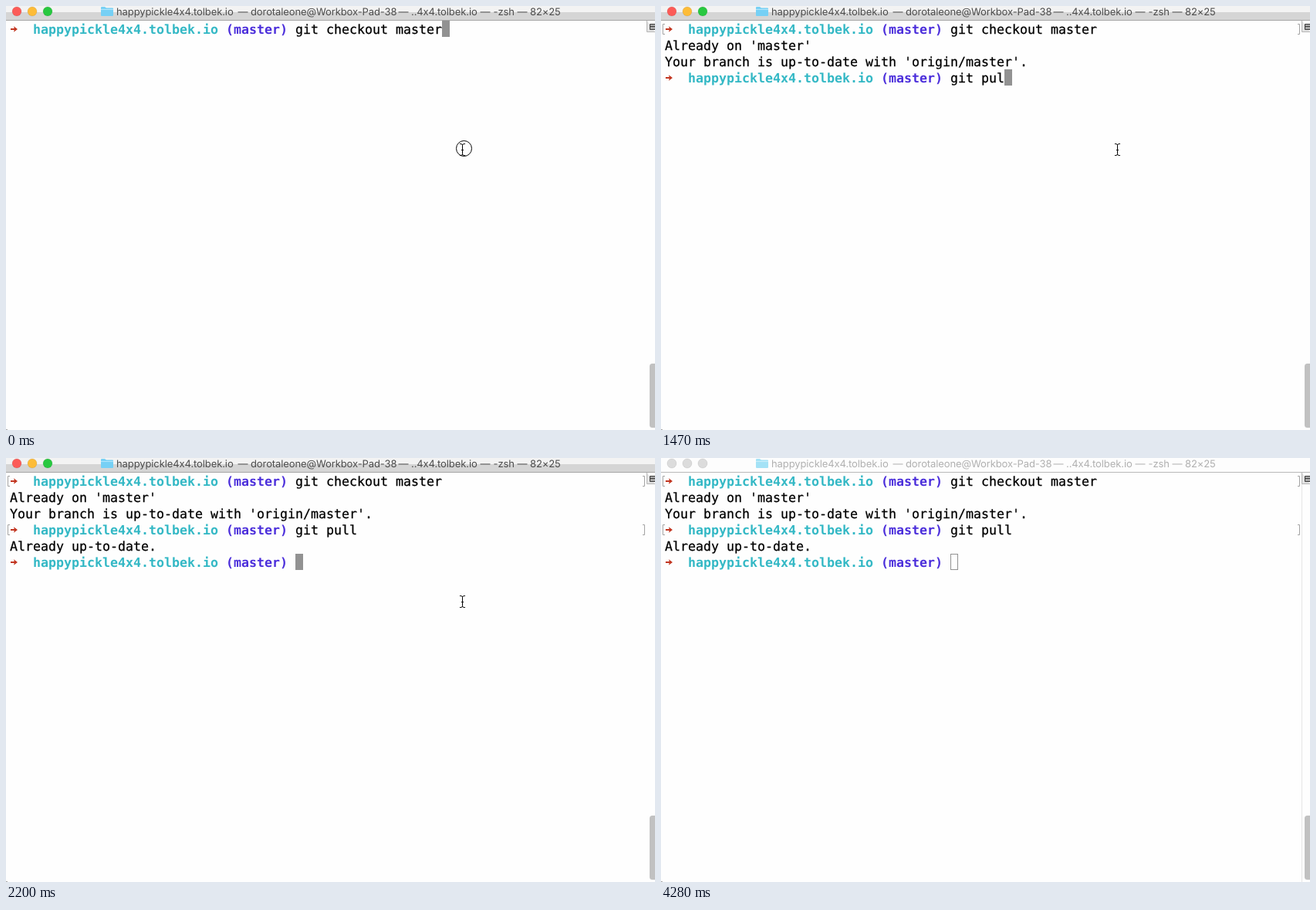
Recreate the animation shown at these times as an HTML page. Size 841 by 549 pixels, loop 4820 ms.

```html
<!DOCTYPE html>
<html lang="en">
<head>
<meta charset="utf-8">
<title>Terminal session</title>
<style>
  html, body { margin: 0; width: 100%; height: 100%; overflow: hidden; background: #fefefe; }
  svg {
    display: block; width: 841px; height: 549px;
    --bar-top: #f3f3f3; --bar: #d5d5d5; --rule: #a6a6a6; --label: #4b4b4b;
    --red: #fc5b57; --yellow: #fdbc38; --green: #28c840; --folder: #76d0f5;
  }
  svg.busy { --folder: #b9def0; }
  svg.idle {
    --bar-top: #fdfdfd; --bar: #fdfdfd; --rule: #b9b9b9; --label: #b0b0b0;
    --red: #dcdcdc; --yellow: #dcdcdc; --green: #dcdcdc; --folder: #a4e2f6;
  }
  text { text-rendering: geometricPrecision; white-space: pre; }
  .label { font: 13px Inter, sans-serif; letter-spacing: -.1px; fill: var(--label); }
  .mono { font: 16.61px "DejaVu Sans Mono", monospace; fill: #000; stroke: #000; stroke-width: .25; }
  .dir, .branch { font: bold 16.61px "DejaVu Sans Mono", monospace; }
  .dir { fill: #33b8c5; }
  .branch { fill: #4b2edb; }
  .lights circle { stroke: #0002; stroke-width: .6; }
  .line { fill: none; stroke: #000; }
</style>
</head>
<body>
<svg id="stage" viewBox="0 0 841 549">
  <defs>
    <g id="prompt">
      <path d="M6 11h6" stroke="#c23621" stroke-width="2"/>
      <path d="M10 7.2 15 11 10 14.8 11 11z" fill="#c23621"/>
      <text class="dir" x="35" y="17">happypickle4x4.tolbek.io</text>
      <text class="branch" x="285" y="17">(master)</text>
    </g>
    <path id="brackets" class="line" style="stroke:#a3a3a3" d="M5 4.5H2.5v13H5M825 4.5h2.5v13H825"/>
  </defs>

  <rect width="841" height="549" fill="#fefefe"/>
  <rect width="841" height="8" fill="var(--bar-top)"/>
  <rect y="8" width="841" height="10" fill="var(--bar)"/>
  <rect y="18" width="841" height="1" fill="var(--rule)"/>
  <g class="lights">
    <circle cx="14" cy="7" r="6" fill="var(--red)"/>
    <circle cx="34" cy="7" r="6" fill="var(--yellow)"/>
    <circle cx="54" cy="7" r="6" fill="var(--green)"/>
  </g>
  <circle data-on="140-290 1910-2200" cx="14" cy="7" r="2" fill="#7c100c"/>

  <g id="title">
    <path d="M123 2q0-1 1-1h4l2 1.5h8q1 0 1 1V12q0 1-1 1h-14q-1 0-1-1z" fill="var(--folder)"/>
    <path d="M123 4.5h16" stroke="#fff" stroke-opacity=".45"/>
    <text class="label" x="143" y="12">happypickle4x4.tolbek.io</text>
    <text class="label" x="300.5" y="12">—</text>
    <text class="label" x="317" y="12">dorotaleone@Workbox-Pad-38</text>
    <text class="label" x="508.5" y="12">—</text>
    <text class="label" x="525" y="12">..4x4.tolbek.io</text>
    <text class="label" x="614.5" y="12">—</text>
    <g data-on="0-2060 2200-4820">
      <text class="label" x="631.5" y="12">-zsh</text>
      <text class="label" x="662.5" y="12">—</text>
      <text class="label" x="679" y="12">82×25</text>
    </g>
    <g data-on="2060-2200">
      <text class="label" x="631" y="12">git-remote-https</text>
      <path d="M742 5v5l-4-2.5z" fill="var(--label)"/>
      <text class="label" x="748" y="12">git pull</text>
      <text class="label" x="792.5" y="12">—</text>
      <text class="label" x="809" y="12">82×25</text>
    </g>
  </g>

  <rect id="caret" width="10" height="21" fill="#929292"/>
  <rect id="hollow" x=".5" y=".5" width="9" height="20" fill="none" stroke="#929292"/>
  <use href="#prompt" y="19"/>
  <text class="mono" x="375" y="36">git checkout master</text>
  <use href="#brackets" y="19" data-on="140-4820"/>
  <g data-on="290-4820">
    <text class="mono" x="5" y="57">Already on 'master'</text>
    <text class="mono" x="5" y="78">Your branch is up-to-date with 'origin/master'.</text>
    <use href="#prompt" y="82"/>
    <text class="mono" id="typed" x="375" y="99"></text>
  </g>
  <use href="#brackets" y="82" data-on="1760-4820"/>
  <text class="mono" x="5" y="120" data-on="2060-4820">Already up-to-date.</text>
  <use href="#prompt" y="124" data-on="2200-4820"/>

  <!-- scroll bar and split button -->
  <rect id="track" x="830" width="1" fill="#e6e6e6"/>
  <rect id="thumb" x="834" y="463" width="10" height="83" rx="3.5"/>
  <path d="M830.5 19v14.5H841" fill="#e4e4e4" stroke="#b5b5b5"/>
  <path d="M841 23.5h-6.5v7H841M835 26.5h6" fill="#a8a8a8" stroke="#3a3a3a"/>
  <rect y="548" width="2" height="1" fill="#a9a9a9"/>

  <circle class="line" data-on="0-140" cx="593.5" cy="184.5" r="10"/>
  <path id="pointer" class="line" data-on="0-3840"
    d="M0 .5h1.5Q3.5.5 3.5 2.5v11Q3.5 15.5 1.5 15.5H0M7 .5H5.5Q3.5.5 3.5 2.5M7 15.5H5.5Q3.5 15.5 3.5 13.5M2 8.5h3"/>
</svg>
<script>
  const LOOP = 4820;
  const $ = id => document.getElementById(id);

  // Each entry starts with its time in ms; the values hold until the next one.
  const caretSteps = [  // column, row
    [0, 56, 0], [140, 0, 1], [290, 37, 3], [890, 39, 3], [1040, 40, 3], [1180, 42, 3],
    [1330, 43, 3], [1470, 44, 3], [1620, 45, 3], [1760, 0, 4], [2060, 0, 5], [2200, 37, 5]
  ];
  const pointerSteps = [[0, 588, 178], [3250, 634, 208], [3400, 734, 282], [3540, 827, 489], [3690, 827, 533]];
  const trackSteps = [[0, 282, 282], [3540, 282, 505], [3690, 282, 549], [4280, 19, 549]];
  const thumbSteps = [[0, '#c1c1c1'], [3690, '#929292'], [3840, '#aaaaaa'], [3980, '#c1c1c1']];

  const timed = [...document.querySelectorAll('[data-on]')].map(el => ({
    el, spans: el.dataset.on.split(' ').map(span => span.split('-').map(Number))
  }));
  const valueAt = (steps, t) => steps.filter(step => step[0] <= t).pop().slice(1);
  const within = (t, from, to) => t >= from && t < to;
  const move = (el, x, y) => el.setAttribute('transform', `translate(${x} ${y})`);
  const show = (el, on) => { el.style.display = on ? '' : 'none'; };

  function render(t) {
    const idle = t >= 4280;
    $('stage').classList.toggle('idle', idle);
    $('stage').classList.toggle('busy', within(t, 1910, 2200));
    for (const { el, spans } of timed) show(el, spans.some(([from, to]) => within(t, from, to)));

    move($('title'), within(t, 2060, 2200) ? -56 : 0, 0);

    const [col, row] = valueAt(caretSteps, t);
    for (const id of ['caret', 'hollow']) {
      move($(id), 5 + col * 10, 19 + row * 21);
      show($(id), (id === 'hollow') === idle);
    }
    $('typed').textContent = 'git pull'.slice(0, row === 3 ? col - 37 : 8);

    move($('pointer'), ...valueAt(pointerSteps, t));
    const [top, bottom] = valueAt(trackSteps, t);
    $('track').setAttribute('y', top);
    $('track').setAttribute('height', bottom - top);
    $('thumb').setAttribute('fill', valueAt(thumbSteps, t)[0]);
  }

  const start = performance.now();
  function tick() {
    render((performance.now() - start) % LOOP);
    requestAnimationFrame(tick);
  }
  tick();
</script>
</body>
</html>
```
